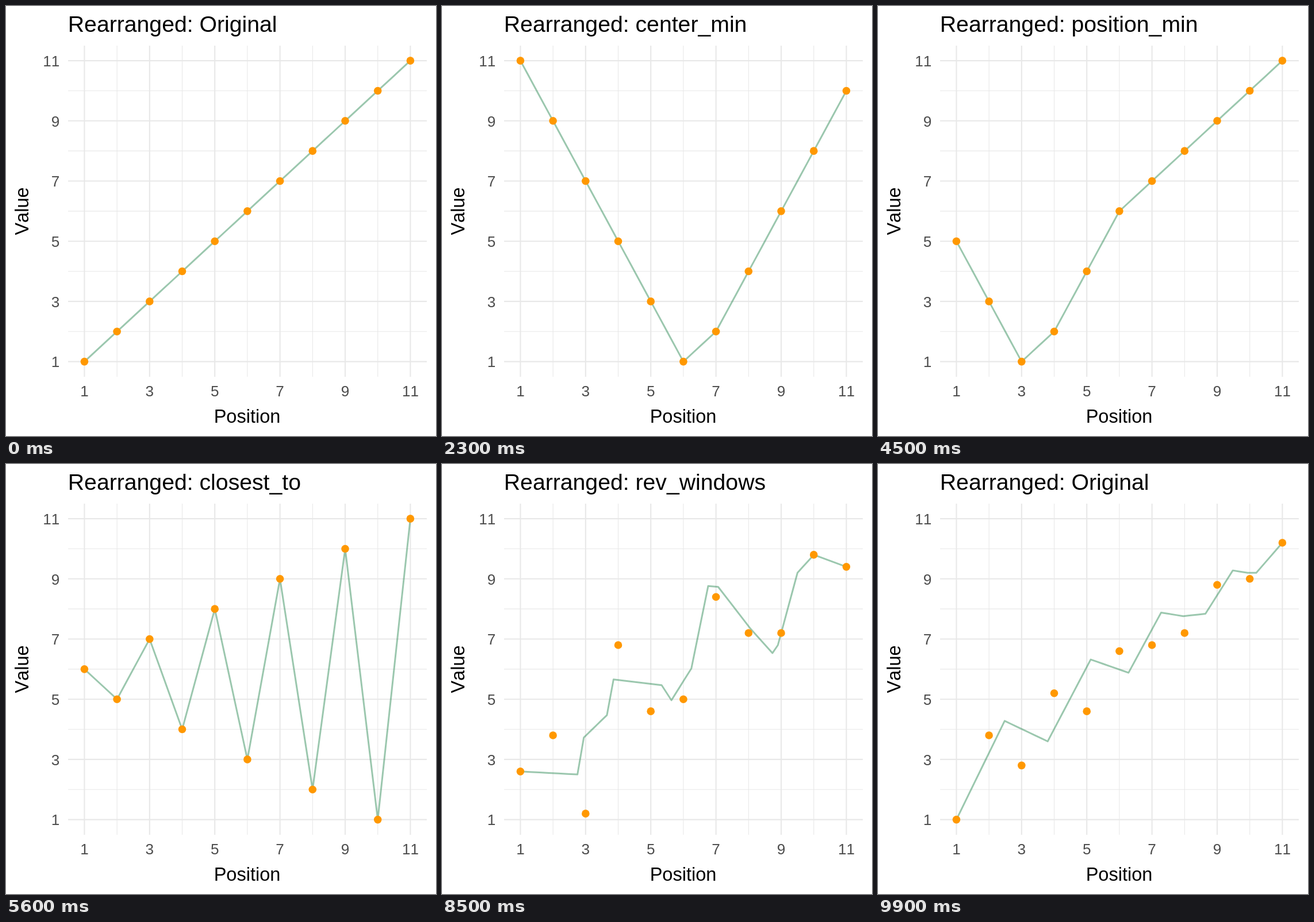
An HTML page for the animation above (10000 ms loop, 748 px wide and 748 px high).

```html
<!DOCTYPE html>
<html lang="en">
<head>
<meta charset="utf-8">
<title>Rearranged</title>
<style>
  html, body { margin: 0; width: 100%; height: 100%; overflow: hidden; background: #fff; }
  svg { display: block; width: 748px; height: 748px; }
  text { font-family: "Liberation Sans", Arial, Helvetica, sans-serif; font-kerning: none; }
  .head { font-size: 39.2px; }
  .label { font-size: 32.5px; text-anchor: middle; }
  .tick { font-size: 26.1px; fill: #4d4d4d; }
  .grid line { stroke: #e8e8e8; }
  .path { fill: none; stroke: #2e8b57; stroke-opacity: .48; stroke-width: 3; stroke-linejoin: round; }
  .dot { fill: #ff9800; }
</style>
</head>
<body>
<svg viewBox="0 0 748 748">
  <g class="grid" id="grid"></g>
  <polyline class="path" id="path"/>
  <g id="dots"></g>
  <g id="ticks"></g>
  <text class="head" id="head" x="107.8" y="45"></text>
  <text class="label" x="419.5" y="725">Position</text>
  <text class="label" transform="translate(39 357) rotate(-90)">Value</text>
</svg>
<script>
const N = 11, SIZE = 50;
const LOOP = 10000, STEP = 100, HOLD = 700, PERIOD = 1100, FIRST = 1200;

const $ = id => document.getElementById(id);
const mix = (a, b, t) => a + (b - a) * t;
const px = x => 136.4 + (x - 1) * 56.7;
const py = y => 618.6 - (y - 1) * 52.35;

// Orderings of 1..N; a centre slightly off a whole number decides ties.
const ordered = Array.from({ length: N }, (_, i) => i + 1);
const sortBy = key => [...ordered].sort((a, b) => key(a) - key(b));
const near = c => sortBy(v => Math.abs(v - c));
const far = c => near(c).reverse();
const flip = values => values.map(v => N + 1 - v);

function valley(pos) {
  const ranks = near(pos + .1);
  return ordered.map(p => ranks.indexOf(p) + 1);
}

function pairExtremes() {
  const values = far(6.1);
  values.splice(6, 0, values.pop());
  return values;
}

const states = Object.entries({
  Original: ordered,
  center_max: flip(valley(6)),
  center_min: valley(6),
  position_max: flip(valley(3)),
  position_min: valley(3),
  closest_to: near(5.9),
  furthest_from: far(3.1),
  rev_windows: sortBy(v => Math.floor((v - 1) / 3) * 10 - v),
  pair_extremes: pairExtremes()
}).map(([name, values]) => ({ name, values, path: resample(values) }));

// Splits the segments in proportion to their length until the path has SIZE points.
function resample(values) {
  const lengths = values.slice(1).map((v, i) => Math.hypot(1, v - values[i]));
  const total = lengths.reduce((a, b) => a + b);
  const extra = SIZE - N;
  let left = extra;
  const cuts = lengths.map(len => {
    const n = Math.min(left, Math.round(extra * len / total));
    left -= n;
    return n;
  });
  cuts[lengths.indexOf(Math.max(...lengths))] += left;

  const points = [[1, values[0]]];
  cuts.forEach((n, i) => {
    for (let k = 1; k <= n + 1; k++) {
      const f = k / (n + 1);
      points.push([i + 1 + f, mix(values[i], values[i + 1], f)]);
    }
  });
  return points;
}

function add(parent, tag, attrs, text = '') {
  const el = document.createElementNS('http://www.w3.org/2000/svg', tag);
  for (const key in attrs) el.setAttribute(key, attrs[key]);
  el.textContent = text;
  return $(parent).appendChild(el);
}

function gridLines(n, width) {
  add('grid', 'line', { x1: 108, x2: 732, y1: py(n), y2: py(n), 'stroke-width': width });
  add('grid', 'line', { x1: px(n), x2: px(n), y1: 69, y2: 645, 'stroke-width': width });
}

for (let n = 2; n < N; n += 2) gridLines(n, 1.1);
for (let n = 1; n <= N; n += 2) {
  gridLines(n, 2.1);
  add('ticks', 'text', { class: 'tick', x: px(n), y: 679, 'text-anchor': 'middle' }, n);
  add('ticks', 'text', { class: 'tick', x: 93.3, y: py(n) + 9.8, 'text-anchor': 'end' }, n);
}
const dots = ordered.map(n => add('dots', 'circle', { class: 'dot', cx: px(n), r: 6.8 }));

// Each state rests for HOLD, then blends into the next; the first blend is one step longer.
function phase(time) {
  const opening = time < FIRST;
  const since = time - FIRST;
  const index = opening ? 0 : 1 + Math.floor(since / PERIOD);
  const age = opening ? time : since % PERIOD;
  const steps = opening ? 6 : 5;
  return [index, age < HOLD ? 0 : ((age - HOLD) / STEP + 1) / steps];
}

function draw(time) {
  const [index, t] = phase(time);
  const from = states[index], to = states[(index + 1) % states.length];
  $('head').textContent = 'Rearranged: ' + (t < .5 ? from : to).name;
  dots.forEach((dot, k) => dot.setAttribute('cy', py(mix(from.values[k], to.values[k], t))));
  $('path').setAttribute('points', from.path.map(([x, y], k) => {
    const [x2, y2] = to.path[k];
    return px(mix(x, x2, t)).toFixed(2) + ',' + py(mix(y, y2, t)).toFixed(2);
  }).join(' '));
}

let last = -1;
const start = performance.now();
function tick() {
  const elapsed = Math.max(0, performance.now() - start) % LOOP;
  const time = Math.floor(elapsed / STEP) * STEP;
  if (time !== last) draw(last = time);
  requestAnimationFrame(tick);
}
tick();
</script>
</body>
</html>
```
